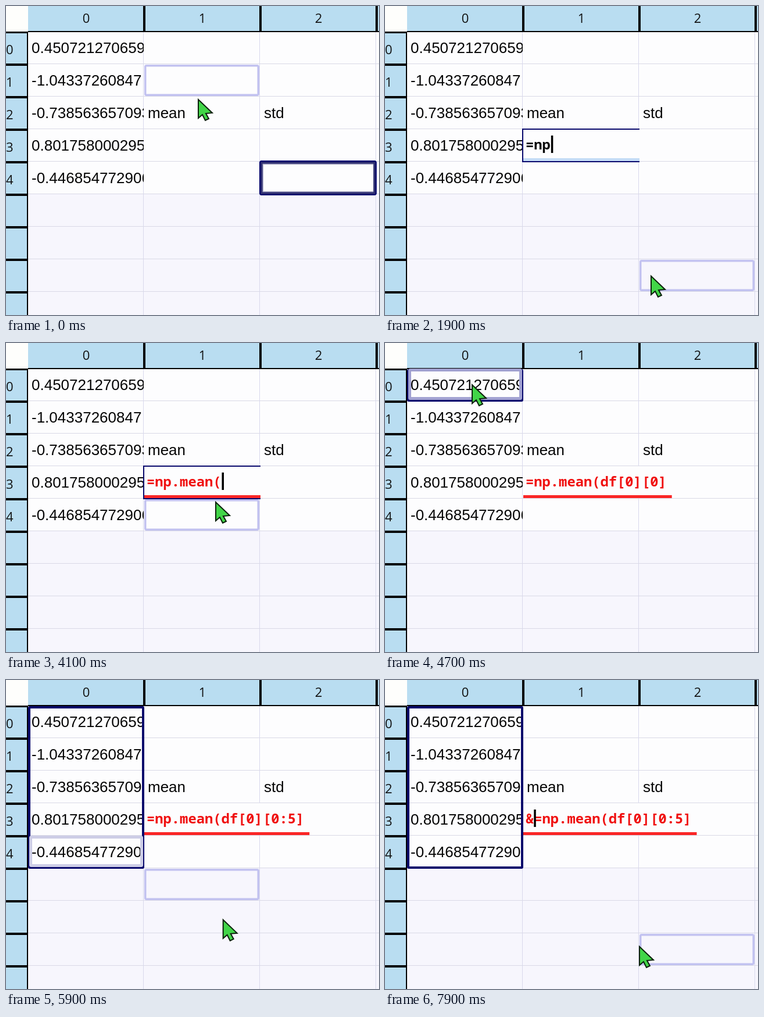
An HTML page with a canvas that plays this animation: 642 px wide and 532 px high, repeating every 8000 ms.

```html
<!DOCTYPE html>
<html lang="en">
<head>
<meta charset="utf-8">
<title>Spreadsheet formula</title>
<style>
html, body { margin: 0; width: 100%; height: 100%; overflow: hidden; background: #fcfcfe; }
canvas { display: block; width: 642px; height: 532px; }
</style>
</head>
<body>
<canvas id="stage" width="642" height="532"></canvas>
<script>
const ctx = document.getElementById('stage').getContext('2d');
const W = 642, H = 532, LOOP = 8000, STEP = 100;
const LEFT = 38, TOP = 44, CW = 200, RH = 56;
const NAVY = '#08086c', RED = '#f01010', PAPER = '#fdfdfe';
const SANS = '26px "Liberation Sans", Arial, sans-serif';
const HEAD = '22px "Open Sans", "Noto Sans", sans-serif';
const MONO = 'bold 23.8px "Noto Sans Mono", "DejaVu Sans Mono", monospace';

const values = ['0.450721270659', '-1.04337260847', '-0.738563657093',
  '0.801758000295', '-0.446854772906'];

// pointer tip: time, x, y
const path = [
  [-200, 331, 120], [0, 331, 161], [300, 331, 233], [900, 331, 233],
  [1400, 458, 465], [3600, 458, 465], [4000, 361, 274], [4200, 361, 274],
  [4600, 150, 72], [4700, 150, 72], [5200, 190, 281], [5500, 190, 281],
  [6100, 438, 459], [8000, 438, 459]
];

// moments at which each typed character appears
const typed = '=np.mean(';
const keys = [1500, 1600, 1800, 2100, 2300, 2400, 2600, 2700, 3000];
const CLICK = 400, PRESS = 4700, RELEASE = 5500, HOME = 6500, AMP = 7500;

const colX = c => LEFT + c * CW;
const rowY = r => TOP + r * RH;

function rect(x, y, w, h, fill) {
  ctx.fillStyle = fill;
  ctx.fillRect(x, y, w, h);
}

function text(s, x, y, font, fill = '#050505', align = 'left') {
  ctx.font = font;
  ctx.textAlign = align;
  ctx.fillStyle = fill;
  ctx.fillText(s, x, y);
}

function frame(x0, y0, x1, y1, width, color, radius = 0) {
  ctx.strokeStyle = color;
  ctx.lineWidth = width;
  ctx.beginPath();
  ctx.roundRect(x0 + width / 2, y0 + width / 2, x1 - x0 - width, y1 - y0 - width, radius);
  ctx.stroke();
}

function pointer(t) {
  let i = 0;
  while (i < path.length - 2 && t >= path[i + 1][0]) i++;
  const [t0, x0, y0] = path[i], [t1, x1, y1] = path[i + 1];
  const k = Math.min(1, Math.max(0, (t - t0) / (t1 - t0)));
  const e = k * k * (3 - 2 * k);
  return [x0 + (x1 - x0) * e, y0 + (y1 - y0) * e];
}

function cellAt([x, y]) {
  return [Math.floor((y - TOP) / RH), Math.floor((x - LEFT) / CW)];
}

function drawGrid() {
  rect(0, 0, W, H, PAPER);
  rect(LEFT, 324, W - LEFT, H - 324, '#f7f6fd');
  for (let r = 1; r < 9; r++) rect(LEFT, rowY(r) - 1, W - LEFT, 1, '#d9d9e6');
  for (let c = 1; c < 4; c++) rect(colX(c) - 2, TOP, 1, H - TOP, '#d9d9ec');
}

function drawValues() {
  ctx.save();
  ctx.beginPath();
  ctx.rect(LEFT, TOP, CW - 1, H);
  ctx.clip();
  values.forEach((v, r) => text(v, 44, 81 + r * RH, SANS));
  ctx.restore();
  text('mean', 244, 193, SANS);
  text('std', 444, 193, SANS);
}

function drawHeaders() {
  const blue = '#b9ddf1';
  rect(LEFT, 0, W - LEFT, TOP, blue);
  rect(0, TOP, LEFT, H - TOP, blue);
  rect(LEFT, 43, W - LEFT, 2, '#000');
  rect(36, TOP, 2, H - TOP, '#000');
  for (let c = 0; c < 3; c++) {
    rect(colX(c + 1) - 2, 0, 4, TOP, '#000');
    text(c, colX(c) + 100, 29, HEAD, '#111', 'center');
  }
  for (let r = 0; r < 9; r++) {
    rect(0, rowY(r) - 1, LEFT, 4, '#000');
    if (r < 5) text(r, 0, 83 + r * RH, HEAD, '#111');
  }
  rect(0, 0, LEFT, TOP, '#fefefc');
}

function drawHover(t) {
  const [r, c] = cellAt(pointer(t - STEP));
  if (r < 0 || c < 0 || (t >= PRESS && t < 5700 && c === 0)) return;
  const x = colX(c), y = rowY(r);
  frame(x, y + 1, x + 198, y + 55, 3.5, '#c2c2f0', 2);
}

function drawActive(r, c) {
  const x = colX(c), y = rowY(r);
  rect(x, y, 199, 55, PAPER);
  frame(x + 3, y + 3, x + 196, y + 53, 2, '#a6a6c0');
  frame(x - 2, y - 2, x + 200, y + 58, 5.5, '#2c2c70', 2);
  frame(x - 2, y - 2, x + 200, y + 58, 2, NAVY, 3);
}

function drawRange(t, last) {
  const bottom = rowY(last + 1) + 1, dragged = t < 5700;
  frame(38, TOP + 1, 238, bottom, 4, NAVY, 1);
  if (dragged) rect(233, TOP + 1, 5, rowY(last) - TOP, NAVY);
  if (t < 7100) {
    frame(40, rowY(last), 236, bottom - 3, 5, dragged ? '#a2a2d2' : '#cdcde6', 1);
  }
}

function formula(t, last) {
  let s = typed.slice(0, keys.filter(k => t >= k).length);
  if (t >= PRESS) s += last ? `df[0][0:${last + 1}]` : 'df[0][0]';
  return t >= AMP ? '&' + s : s;
}

function drawEditor(t, s) {
  ctx.font = MONO;
  const width = ctx.measureText(s).width;
  const end = Math.max(438, 243 + width + 8);
  const bad = /\.$|\(/.test(s);
  rect(238, 212, end - 238, 55, PAPER);
  rect(238, 262, end - 238, 5, bad ? '#fa2626' : '#c4dcf6');
  if (t < PRESS) {
    rect(236, 211, 202, 2, NAVY);
    rect(236, 267, 202, 2, NAVY);
    rect(236, 211, 2, 58, NAVY);
  }
  text(s, 242, 247, MONO, bad ? RED : '#080808');

  // caret restarts its blink with every key
  if (t >= PRESS && t < HOME) return;
  const last = [...keys, HOME, AMP].filter(k => k <= t).pop();
  if ((t - last) % 1060 >= 530) return;
  const before = t >= AMP ? '&' : t >= HOME ? '' : s;
  rect(242 + ctx.measureText(before).width + (t < HOME ? 1 : 0), 223, 3.5, 30, '#000');
}

function drawPointer([x, y]) {
  const pts = [[0, 0], [0, 32], [7, 26], [12, 36], [18, 33], [13, 24], [24, 23]];
  ctx.beginPath();
  pts.forEach(([dx, dy]) => ctx.lineTo(x + dx, y + dy));
  ctx.closePath();
  ctx.fillStyle = '#42d548';
  ctx.fill();
  ctx.lineJoin = 'miter';
  ctx.lineWidth = 2;
  ctx.strokeStyle = '#0c200c';
  ctx.stroke();
}

function draw(t) {
  const pos = pointer(t);
  const last = t < RELEASE ? Math.max(0, Math.min(4, cellAt(pos)[0])) : 4;
  drawGrid();
  drawValues();
  drawHeaders();
  drawHover(t);
  if (t >= PRESS) drawRange(t, last);
  if (t >= keys[0]) drawEditor(t, formula(t, last));
  else if (t < CLICK) drawActive(4, 2);
  else drawActive(3, 1);
  drawPointer(pos);
}

const start = performance.now();
function tick() {
  const t = (performance.now() - start) % LOOP;
  draw(Math.floor(t / STEP) * STEP);
  requestAnimationFrame(tick);
}
tick();
</script>
</body>
</html>
```
